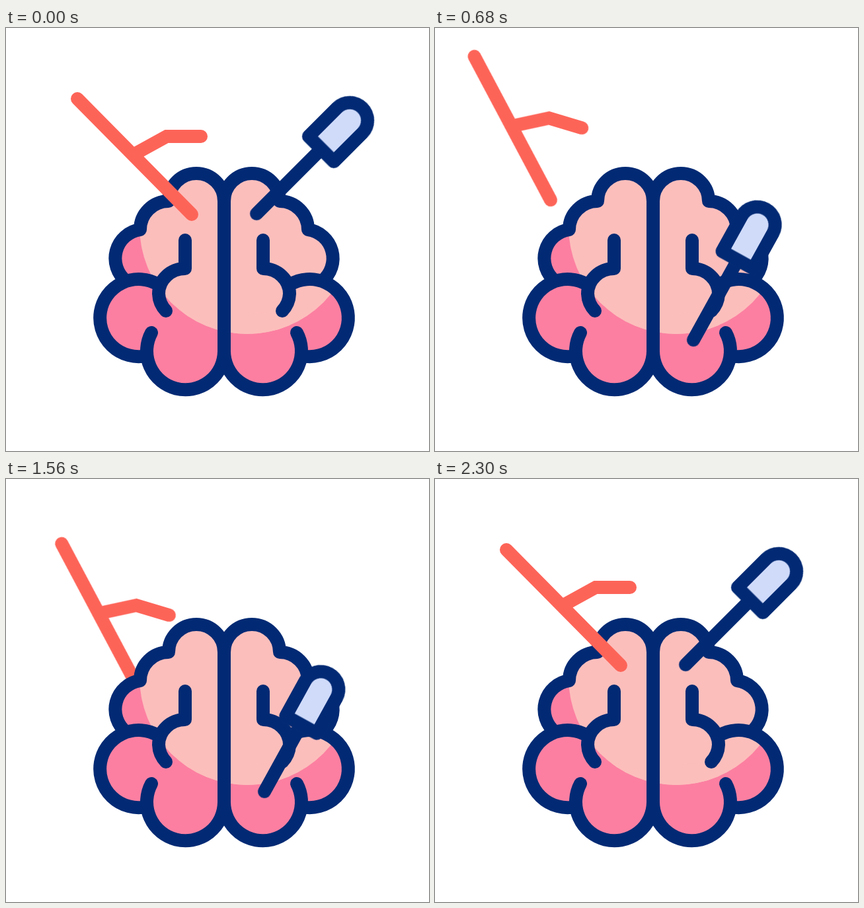
An HTML page for the animation above (2400 ms loop, 640 by 640 pixels).

```html
<!DOCTYPE html>
<html lang="en">
<head>
<meta charset="utf-8">
<title>Brain surgery icon</title>
<style>
  :root { --navy: #022a74; --pink: #fc7fa1; --skin: #fcbebb; --red: #fd6458; --steel: #d0dbfa; }
  html, body { margin: 0; width: 100%; height: 100%; overflow: hidden; background: #fff; }
  svg { display: block; width: 100%; height: 100%; }

  .line { fill: none; stroke: var(--navy); stroke-width: 20; stroke-linecap: round; stroke-linejoin: round; }
  .probe { fill: none; stroke: var(--red); stroke-width: 20; stroke-linecap: round; }

  /* The second half of the loop mirrors the first */
  .brain, .probe, .driver, .handle, .front, .back {
    animation: 1200ms cubic-bezier(.333, 0, .667, 1) infinite alternate both;
  }
  .brain { animation-name: pulse; transform-origin: 330px 383.5px; }
  .probe { animation-name: probe; }
  .driver { animation-name: driver; }
  .handle { animation-name: slide; }
  .front { animation-name: front; }
  .back { animation-name: back; }

  @keyframes pulse {
    0%, 16.667%, 50%, 100% { transform: scale(1); }
    33.333% { transform: scale(1.035); }
  }
  @keyframes probe {
    0%, 8.333% { transform: translate(108px, 107px) rotate(0deg); }
    50% { transform: translate(54.7px, 32.1px) rotate(16.7deg); }
    83.333%, 100% { transform: translate(100.5px, 134px) rotate(16.7deg); }
  }
  @keyframes driver {
    0%, 16.667% { transform: translate(379px, 281px) rotate(45deg); }
    58.333%, 100% { transform: translate(391px, 473px) rotate(28.9deg); }
  }
  @keyframes slide {
    0%, 58.333% { transform: translateY(0px); }
    88.333%, 100% { transform: translateY(69px); }
  }
  @keyframes front {
    0%, 50% { opacity: 1; }
    50.01%, 100% { opacity: 0; }
  }
  @keyframes back {
    0%, 50% { opacity: 0; }
    50.01%, 100% { opacity: 1; }
  }
</style>
</head>
<body>
<svg viewBox="0 0 640 640">
  <defs>
    <g id="halfFill">
      <path d="M330 262A42 42 0 0 0 246 262A43 43 0 0 0 203 305A44 44 0 0 0 182 383L271 489H331V262Z"/>
      <circle cx="200" cy="438.5" r="58.5"/>
      <circle cx="271.5" cy="488.5" r="58.5"/>
    </g>
    <g id="fill">
      <use href="#halfFill"/>
      <use href="#halfFill" transform="matrix(-1 0 0 1 660 0)"/>
    </g>
    <path id="halfLine" d="M330 262A42 42 0 0 0 246 262A43 43 0 0 0 203 305A44 44 0 0 0 182 383
      M230 388A58.5 58.5 0 1 0 212 496
      M220 461A58.5 58.5 0 1 0 330 489
      M271 321V364A40 38 0 0 0 231 402A40 40 0 0 0 242 428"/>
    <path id="probeShape" d="M0 0L173 175M86 84L135 57H187"/>
    <clipPath id="light"><circle cx="365" cy="300" r="163"/></clipPath>
  </defs>

  <g class="back"><use href="#probeShape" class="probe"/></g>

  <g class="brain">
    <use href="#fill" fill="var(--pink)"/>
    <g clip-path="url(#light)"><use href="#fill" fill="var(--skin)"/></g>
    <g class="line">
      <use href="#halfLine"/>
      <use href="#halfLine" transform="matrix(-1 0 0 1 660 0)"/>
      <path d="M330 262V489"/>
    </g>
  </g>

  <g class="driver">
    <path class="line" d="M0 0V-138"/>
    <g class="handle">
      <path class="line" style="fill: var(--steel)" d="M-27 -138.5V-199.5A27 27 0 0 1 27 -199.5V-138.5Z"/>
    </g>
  </g>

  <g class="front"><use href="#probeShape" class="probe"/></g>
</svg>
</body>
</html>
```
